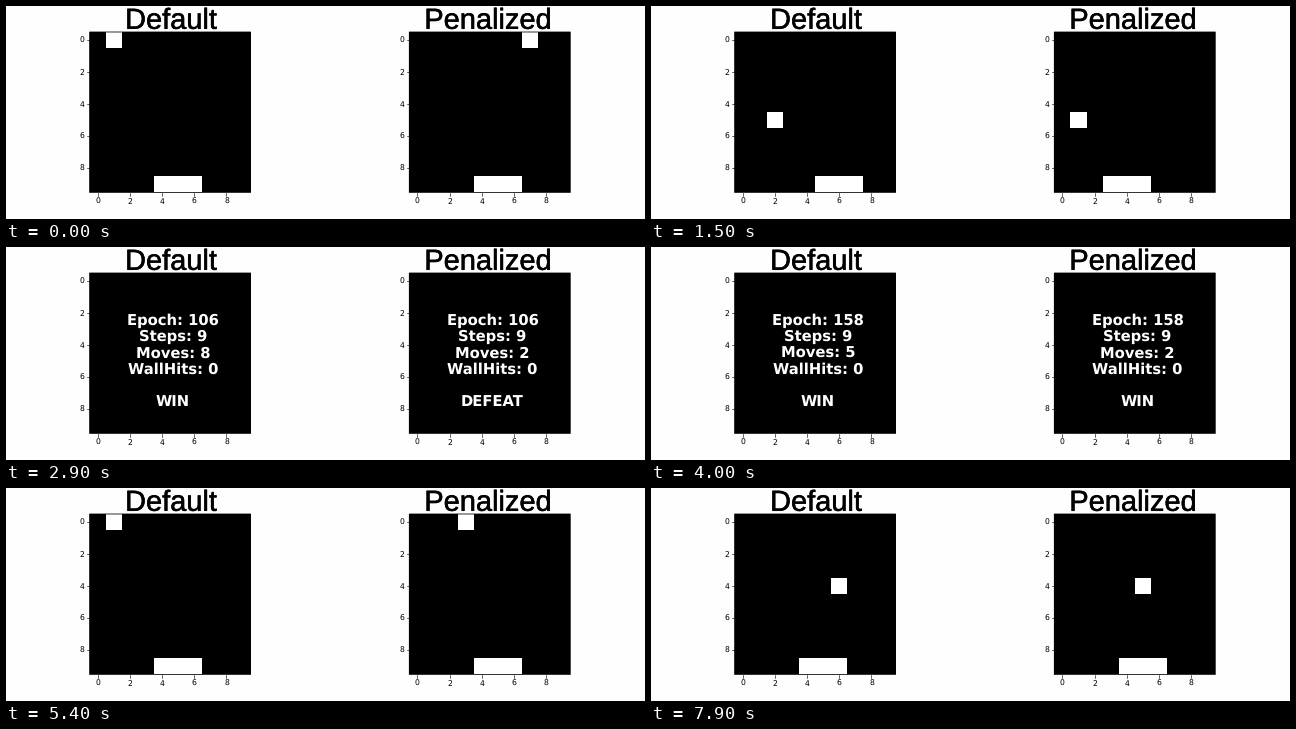
These frames come from a looping animation (639x213 px, 8 s). A matplotlib script:

```python
import matplotlib.pyplot as plt
from matplotlib.animation import FuncAnimation
from matplotlib.patches import Rectangle
from matplotlib.patheffects import withStroke

plt.rcParams["text.hinting"] = "none"

W, H, DPI = 639, 213, 100
FRAMES, INTERVAL = 80, 100
PERIOD, STEP, ROWS = 1080, 80, 9     # ms per game, ms per ball step, steps per game
CW, CH, TOP = 16.1, 16.05, 25.6      # cell size and top edge of the boards
BACK = "#fefefe"

# One entry per game: (start column, direction, paddle moves) for each board.
GAMES = [
    ((1, 1, "LRL.RLLRL"), (7, 1, "R..R.L.R.")),
    ((7, -1, "LRRRLLLLL"), (6, -1, "...L.....")),
    ((9, -1, "LRLLLRLL."), (0, 1, "..R...R..")),
    ((3, 1, "R.LR.L.R."), (7, 1, "...L..L..")),
    ((5, 1, "RL.RL.R.L"), (2, 1, "....R....")),
    ((1, -1, "R.LR.RLR."), (3, -1, "...R..R..")),
    ((1, 1, "RLR.R.LR."), (6, -1, "...L.....")),
    ((8, 1, "RLRL.LLL."), (1, 1, "....R.R..")),
]


def pt(px):
    return px * 72 / DPI


def ball_col(start, direction, row):
    """Column of the ball, bouncing between the side walls."""
    return 9 - abs(9 - (start + direction * row) % 18)


def paddle_col(moves, row):
    """Leftmost column of the paddle."""
    done = moves[:row]
    return 4 + done.count("R") - done.count("L")


fig = plt.figure(figsize=(W / DPI, H / DPI), dpi=DPI, facecolor=BACK)
ax = fig.add_axes([0, 0, 1, 1])
ax.set_xlim(0, W)
ax.set_ylim(H, 0)
ax.axis("off")


class Board:
    def __init__(self, x, title, title_x):
        self.x = x
        ax.add_patch(Rectangle((x, TOP), 10 * CW, 10 * CH, fc="black", lw=0))
        ax.add_patch(Rectangle((x, TOP + 0.4), 10 * CW, 10 * CH, fill=False,
                               ec="black", lw=pt(0.8), snap=False, zorder=3))
        ax.text(title_x, 22.8, title, ha="center", va="baseline",
                family="Liberation Sans", size=pt(29), color="black",
                path_effects=[withStroke(linewidth=pt(0.5), foreground="black")])
        self.draw_ticks()
        self.ball = ax.add_patch(Rectangle((x, TOP), CW, CH, fc="white", lw=0))
        self.paddle = ax.add_patch(
            Rectangle((x, TOP + 9 * CH), 3 * CW, CH, fc="white", lw=0))
        self.lines = [
            ax.text(x + 83.2, 78.2 + 16.1 * i, "", ha="center", va="baseline",
                    family="DejaVu Sans", weight="bold", size=pt(14.8), color="white")
            for i in (0, 1, 2, 3, 5)]

    def draw_ticks(self):
        style = dict(family="DejaVu Sans", size=pt(7.6), color="black")
        for n in range(0, 10, 2):
            tx = self.x + (n + 0.5) * CW
            ty = TOP + (n + 0.5) * CH
            ax.plot([tx, tx], [187, 189.5], color="black", lw=pt(0.6))
            ax.plot([self.x - 2.5, self.x], [ty, ty], color="black", lw=pt(0.6))
            ax.text(tx, 197.6, str(n), ha="center", va="baseline", **style)
            ax.text(self.x - 5, ty + 2.8, str(n), ha="right", va="baseline", **style)

    def show(self, game, row, epoch):
        start, direction, moves = game
        playing = row < ROWS
        self.ball.set_visible(playing)
        self.paddle.set_visible(playing)
        if playing:
            self.ball.set_xy((self.x + ball_col(start, direction, row) * CW,
                              TOP + row * CH))
            self.paddle.set_x(self.x + paddle_col(moves, row) * CW)
            report = [""] * 5
        else:
            offset = ball_col(start, direction, ROWS) - paddle_col(moves, ROWS)
            report = [f"Epoch: {epoch}", f"Steps: {ROWS}",
                      f"Moves: {ROWS - moves.count('.')}", "WallHits: 0",
                      "WIN" if 0 <= offset <= 2 else "DEFEAT"]
        for line, text in zip(self.lines, report):
            line.set_text(text)


boards = [Board(83.6, "Default", 165), Board(403.3, "Penalized", 482)]


def update(frame):
    index, time = divmod(frame * INTERVAL, PERIOD)
    row = min(time // STEP, ROWS)
    for board, game in zip(boards, GAMES[index]):
        board.show(game, row, 2 + 52 * index)
    return []


anim = FuncAnimation(fig, update, frames=FRAMES, interval=INTERVAL,
                     repeat=True, repeat_delay=0, blit=False)
plt.show()
```
